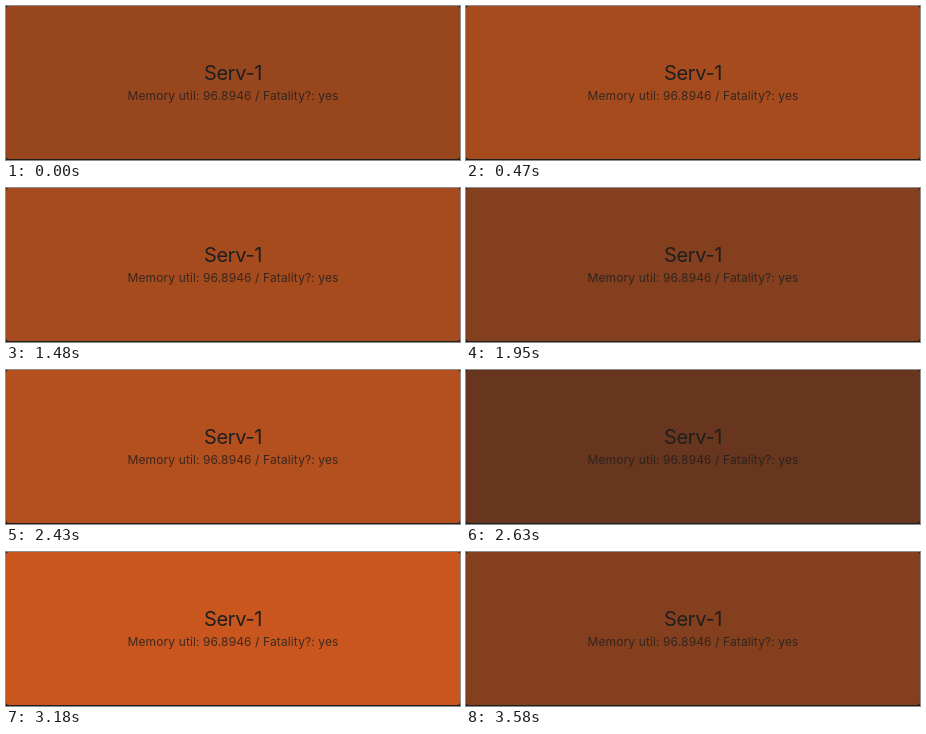
An HTML page that plays this animation: 454x154 px, repeating every 3.65 s.

```html
<!DOCTYPE html>
<html lang="en">
<head>
<meta charset="utf-8">
<title>Server status card</title>
<style>
  html, body { margin: 0; width: 100%; height: 100%; overflow: hidden; background: #1e1e1e; }
  svg { display: block; }
  text { font-family: Inter, sans-serif; font-weight: 400; font-optical-sizing: none; text-anchor: middle; fill: #1e1e1e; }
  .title { font-size: 20px; letter-spacing: -.017em; }
  .detail { font-size: 12px; letter-spacing: .01em; fill-opacity: .8; }
</style>
</head>
<body>
<svg width="454" height="154" viewBox="0 0 454 154">
  <g id="card">
    <rect width="454" height="153" rx="3" fill="#c8561e"/>
    <text class="title" x="227" y="74">Serv-1</text>
    <text class="detail" x="227" y="94">Memory util: 96.8946 / Fatality?: yes</text>
  </g>
</svg>
<script>
  const LOOP = 3650;
  const DIM = 0.435;
  const rise = [0.29, 0.53, 0.77, 1];
  const fall = [0.65, 0.32, 0];
  const slowFall = [0.8, 0.55, 0.3, 0];

  // Each ramp: time of its first level, time of its last level, levels.
  const ramps = [
    [0, 140, [0.5, 0.75, 1]],
    [470, 600, fall],
    [940, 1150, rise],
    [1480, 1620, fall],
    [1950, 2170, rise],
    [2430, 2630, slowFall],
    [2960, 3180, rise],
    [3440, 3580, slowFall.slice(0, 3)],
  ];

  const card = document.getElementById("card");

  function levelAt(time) {
    const [start, end, levels] = ramps.findLast(([begin]) => begin <= time);
    const last = levels.length - 1;
    const index = Math.floor((time - start) * last / (end - start));
    return levels[Math.min(index, last)];
  }

  function draw() {
    const level = levelAt(performance.now() % LOOP);
    card.setAttribute("opacity", DIM + (1 - DIM) * level);
    requestAnimationFrame(draw);
  }

  draw();
</script>
</body>
</html>
```
